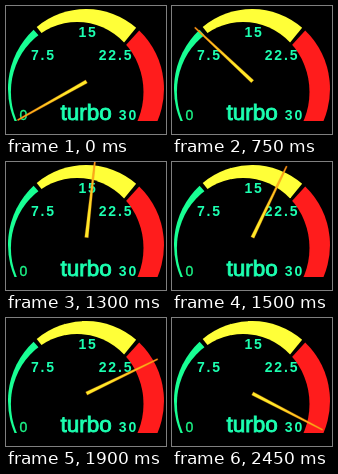
Animation, 160 px wide and 128 px high, one loop 2500 ms. Source, as an HTML page:

```html
<!DOCTYPE html>
<html lang="en">
<head>
<meta charset="utf-8">
<title>Turbo gauge</title>
<style>
  html, body { margin: 0; height: 100%; overflow: hidden; background: #000; }
  svg { display: block; width: 100%; height: 100%; }
  text { fill: #1cffb0; font: bold 14px "Liberation Sans", Arial, sans-serif; letter-spacing: 1.8px; text-anchor: middle; }
  .name { font-size: 22.5px; font-weight: normal; letter-spacing: 0; stroke: #1cffb0; stroke-width: .9; }
  .zero { font-weight: normal; fill: #1cf488; stroke: #1cf488; stroke-width: .4; }
</style>
</head>
<body>
<svg viewBox="0 0 160 128">
  <defs>
    <clipPath id="dial"><path d="M0 0H160V115H0Z"/></clipPath>
    <linearGradient id="heat" gradientUnits="userSpaceOnUse" x1="0" y1="0" x2="0" y2="-79">
      <stop offset=".3" stop-color="#ffe828"/>
      <stop offset="1" stop-color="#ff9414"/>
    </linearGradient>
  </defs>
  <g id="zones" clip-path="url(#dial)"></g>
  <ellipse cx="71.2" cy="86" rx="66.3" ry="70"/>
  <text class="zero" x="18.4" y="114">0</text>
  <text x="37.4" y="53.5">7.5</text>
  <text x="82" y="30.5">15</text>
  <text x="110" y="53.5">22.5</text>
  <text x="122.4" y="114">30</text>
  <text class="name" x="80.2" y="114">turbo</text>
  <path id="needle" d="M-1.8 0L-.7 -79H.7L1.8 0Z" fill="url(#heat)" stroke="#e07810" stroke-opacity=".5" stroke-width=".5"/>
</svg>
<script>
const STEP = 50, STEPS = 50, START = -119.3, TURN = 4.83;
const needle = document.getElementById('needle');

// Point on the outer rim; angles run clockwise from the top.
function rim(degrees) {
  const a = degrees * Math.PI / 180;
  return `${80 + 78 * Math.sin(a)} ${83 - 80 * Math.cos(a)}`;
}

function zone(from, to, color) {
  return `<path fill="${color}" d="M80 83L${rim(from)}A78 80 0 0 1 ${rim(to)}Z"/>`;
}

document.getElementById('zones').innerHTML =
  zone(-125, -42.2, '#18ff94') + zone(-39.2, 40, '#ffff38') + zone(43, 125, '#ff1c1c');

function draw(now) {
  const step = Math.floor(now / STEP) % STEPS;
  needle.setAttribute('transform', `translate(80.5 75.5) rotate(${START + TURN * step})`);
  requestAnimationFrame(() => draw(performance.now()));
}
draw(0);
</script>
</body>
</html>
```
